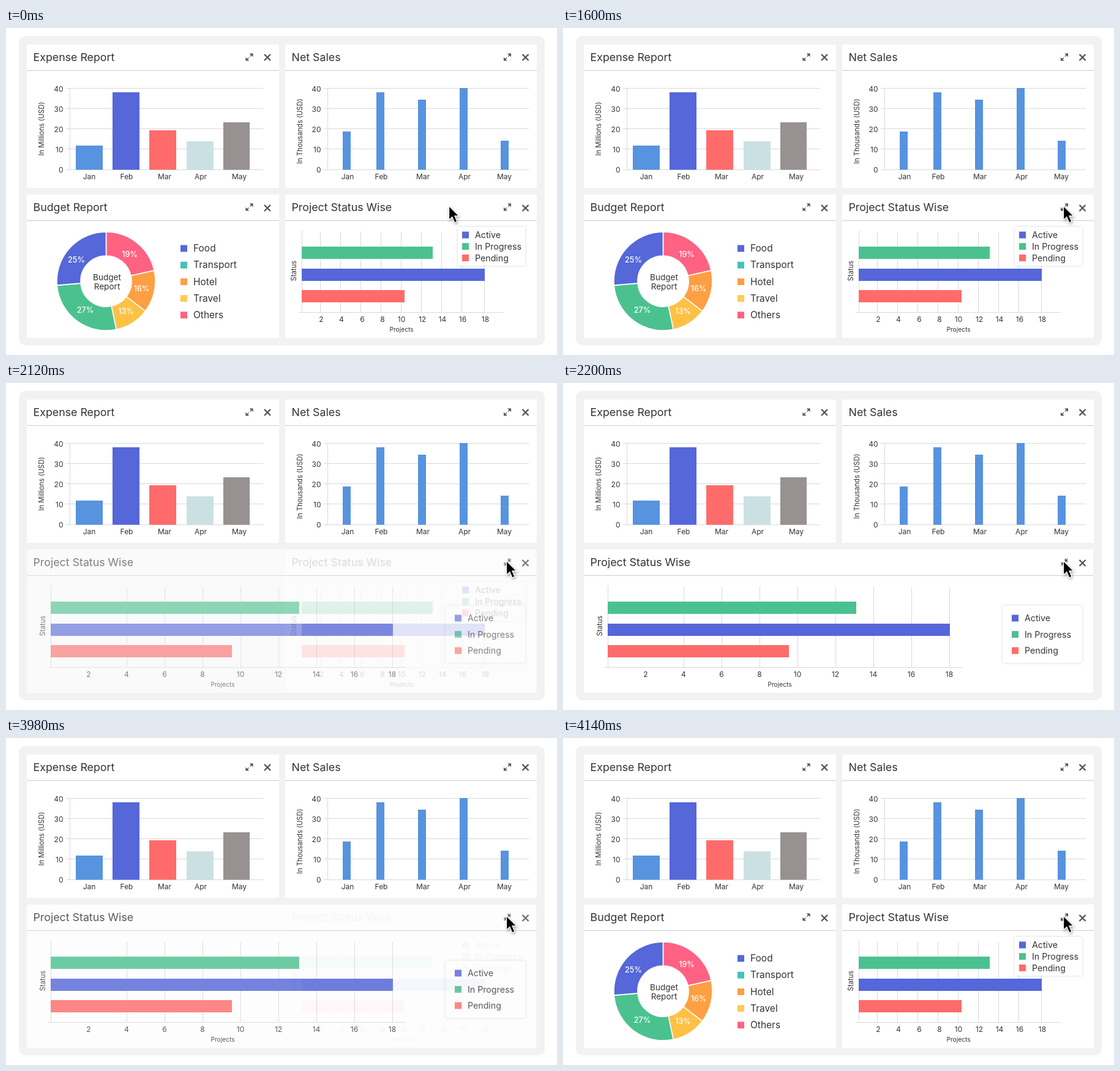
Write an HTML page that moves like this. It is 900 by 534 pixels and loops after 4.64 s.

```html
<!DOCTYPE html>
<html lang="en">
<head>
<meta charset="utf-8">
<title>Dashboard</title>
<style>
html, body { margin: 0; width: 100%; height: 100%; overflow: hidden; background: #fff; }
svg { display: block; width: 900px; height: 534px; font-family: Inter, "Open Sans", sans-serif; }
text { fill: #333; }
.title { font-size: 17.8px; }
.tick { font-size: 12px; }
.unit { font-size: 11.2px; }
.axis { font-size: 10.2px; }
.key { font-size: 14.2px; }
.big { font-size: 15.5px; }
.hub { font-size: 13.6px; }
.pct { font-size: 12.6px; font-weight: 500; fill: #fff; }
.mid { text-anchor: middle; }
.end { text-anchor: end; }
.grid { stroke: #d9d9d9; fill: none; }
.rule { stroke: #ccc; }
.icon { fill: #555; stroke: #555; stroke-width: 1.3; }
.close { stroke: #555; stroke-width: 2.4; }
.box { fill: #fff; filter: drop-shadow(0 0 2px rgba(0, 0, 0, .16)); }
.pointer { fill: #000; stroke: #fff; stroke-width: 1.3; filter: drop-shadow(1px 2px 2px rgba(0, 0, 0, .35)); }

#budget, #compact, #wide, #cursor, .press { animation: 4640ms infinite; }
#budget { animation-name: budget; animation-timing-function: step-end; }
#compact { animation-name: compact; animation-timing-function: steps(5, end); }
#wide { animation-name: wide; animation-timing-function: steps(5, end); }
#cursor { animation-name: glide; animation-timing-function: steps(5, end); }
.press { animation-name: press; animation-timing-function: step-end; }
@keyframes budget {
  0% { opacity: 1; }
  38.79% { opacity: 0; }
  89.22%, 100% { opacity: 1; }
}
@keyframes compact {
  0%, 43.1% { opacity: 1; }
  47.41%, 84.91% { opacity: 0; }
  89.22%, 100% { opacity: 1; }
}
@keyframes wide {
  0%, 43.1% { opacity: 0; }
  47.41%, 84.91% { opacity: 1; }
  89.22%, 100% { opacity: 0; }
}
@keyframes glide {
  0%, 21.55% { transform: translate(724px, 291px); }
  25.86%, 100% { transform: translate(818px, 291px); }
}
@keyframes press {
  0% { transform: scale(1); }
  30.17% { transform: scale(.8); }
  34.48% { transform: scale(1); }
  79.74% { transform: scale(.8); }
  84.05%, 100% { transform: scale(1); }
}
</style>
</head>
<body>
<svg id="stage" viewBox="0 0 900 534"></svg>
<script>
const BLUE = '#5567d9', SKY = '#5793de', GREEN = '#4bc190', RED = '#ff6b6b';
const EXPAND = 'M-4.5 4.5L-1 1M1 -1L4.5 -4.5M1.8 -5.4H5.4V-1.8ZM-1.8 5.4H-5.4V1.8Z';
const SHRINK = 'M-5.5 5.5L-2.5 2.5M2.5 -2.5L5.5 -5.5M1.4 -5V-1.4H5ZM-1.4 5V1.4H-5Z';

const rect = (x, y, w, h, fill, extra = '') =>
  `<rect x="${x}" y="${y}" width="${w}" height="${h}" fill="${fill}" ${extra}/>`;
const text = (x, y, cls, s) => `<text x="${x}" y="${y}" class="${cls}">${s}</text>`;
const upright = (x, y, cls, s) =>
  `<text transform="translate(${x} ${y}) rotate(-90)" class="${cls} mid">${s}</text>`;
const path = (d, cls) => `<path d="${d}" class="${cls}"/>`;

function panel(x, y, w, title, right, icon = EXPAND, cls = '') {
  const dy = y > 100 ? 22 : 21;
  return rect(x, y, w, 234, '#fff')
    + path(`M${x} ${y + 42.5}h${w}`, 'rule')
    + text(x + 10.5, y + 27, 'title', title)
    + `<g transform="translate(${right - 29.5} ${y + 20.5})"><path d="${icon}" class="icon ${cls}"/></g>`
    + `<g transform="translate(${right} ${y + dy})">${path('M-5 -5L5 5M5 -5L-5 5', 'close')}</g>`;
}

// bars: [label, label centre, x, width, top, colour]
function columns(x0, x1, unitX, unitY, unit, bars) {
  let out = upright(unitX, unitY, 'unit', unit);
  for (let i = 0; i < 5; i++) {
    const y = [98.5, 131.5, 164.5, 197.5, 231.5][i];
    out += path(`M${x0 - 6} ${y}H${x1}`, 'grid')
      + text(x0 - 10.5, y + 5 - (i > 3 ? 1 : 0), 'tick end', 40 - 10 * i);
  }
  out += path(`M${x0 + .5} 98V232`, 'grid');
  for (const [name, cx, x, w, top, fill] of bars)
    out += rect(x, top, w, 231.5 - top, fill) + text(cx, 247, 'tick mid', name);
  return out;
}

function legend(x, rows, gap, cls, items) {
  return items.map(([name, fill], i) => {
    const y = rows + gap * i;
    return rect(x, y - 5.5, 11, 11, fill) + text(x + 21, y + 5.2, cls, name);
  }).join('');
}

function projects(x0, x1, lines, ticks, ends, nameX) {
  let out = path(`M${x0 + .5} 331V464M${x0 - 5} 464.5H${x1}`, 'grid')
    + path(lines.map(x => `M${x} 333V464`).join(''), 'grid');
  [[357, GREEN], [393, BLUE], [428, RED]].forEach(([y, fill], i) => {
    out += rect(x0, y, ends[i] - x0, 20, fill);
  });
  ticks.forEach((x, i) => { out += text(x, 480, 'tick mid', 2 * i + 2); });
  return out + text(nameX, 496, 'axis mid', 'Projects') + upright(x0 - 9.5, 396.5, 'unit', 'Status');
}

// slices: [end angle in degrees clockwise from the top, colour]
function donut(cx, cy, R, r, slices) {
  const at = (a, d) => {
    const t = a * Math.PI / 180;
    return `${(cx + d * Math.sin(t)).toFixed(2)} ${(cy - d * Math.cos(t)).toFixed(2)}`;
  };
  let a = 0, out = '';
  for (const [b, fill] of slices) {
    out += `<path d="M${at(a, R)}A${R} ${R} 0 0 1 ${at(b, R)}L${at(b, r)}A${r} ${r} 0 0 0 ${at(a, r)}Z" fill="${fill}" stroke="#fff" stroke-width="1.6"/>`;
    a = b;
  }
  return out;
}

const series = (n, start, step) => Array.from({ length: n }, (_, i) => start + step * i);
const states = [['Active', BLUE], ['In Progress', GREEN], ['Pending', RED]];

const expense = panel(34, 27, 412, 'Expense Report', 427)
  + columns(104, 420, 62, 164.5, 'In Millions (USD)', [
    ['Jan', 136, 114, 44, 192, SKY], ['Feb', 197, 174, 44, 105, BLUE],
    ['Mar', 259, 234, 44, 167, RED], ['Apr', 318, 295, 44, 185, '#cbe0e3'],
    ['May', 381, 355, 43, 154, '#989191']]);

const sales = panel(456, 27, 411, 'Net Sales', 848.5)
  + columns(525, 854, 483.5, 168.5, 'In Thousands (USD)', [
    ['Jan', 558, 550, 169], ['Feb', 613, 605, 105], ['Mar', 681, 673, 117],
    ['Apr', 749, 741, 98], ['May', 814, 808, 184]]
    .map(([name, cx, x, top]) => [name, cx, x, 13, top, SKY]));

const budget = panel(34, 272, 412, 'Budget Report', 427)
  + donut(163.5, 413.5, 80.5, 41.5, [[77.4, '#ff6283'], [127.4, '#ff9f43'],
    [168, '#ffc144'], [265.3, GREEN], [360, BLUE]])
  + [[115, 383, 25], [202, 374, 19], [221.5, 430, 16], [196, 467, 13], [129.5, 465, 27]]
    .map(([x, y, n]) => text(x, y, 'pct mid', n + '%')).join('')
  + text(165, 411.5, 'hub mid', 'Budget') + text(165, 426.5, 'hub mid', 'Report')
  + legend(285, 360, 27.2, 'big', [['Food', BLUE], ['Transport', '#47c0bd'],
    ['Hotel', '#ff9f43'], ['Travel', '#ffca57'], ['Others', '#ff6283']]);

const compact = panel(456, 272, 411, 'Project Status Wise', 848.5, EXPAND, 'press')
  + projects(483, 813, [...series(8, 513.5, 33), 781.5],
    [515, 548, 582, 615, 646, 680, 713, 746, 783], [697, 782, 651], 646)
  + rect(738, 325, 110, 63, '#fff', 'rx="1" class="box"')
  + legend(745, 338, 18.7, 'key', states);

const wide = panel(34, 272, 832, 'Project Status Wise', 848.5, SHRINK, 'press')
  + projects(73, 653, series(8, 197.5, 62), series(9, 135, 62), [479, 632, 369], 354)
  + rect(718, 364, 130, 93, '#fff', 'rx="1" class="box"')
  + legend(733, 384, 26.5, 'key', states);

document.getElementById('stage').innerHTML =
  rect(21, 13, 859, 505, '#f2f2f2', 'rx="10"') + expense + sales
  + `<g id="budget">${budget}</g><g id="compact">${compact}</g><g id="wide">${wide}</g>`
  + `<g id="cursor">${path('M-.5 -.5V22.5L4.8 17.6L8.8 27L13 25.2L9 16H16Z', 'pointer')}</g>`;
</script>
</body>
</html>
```
